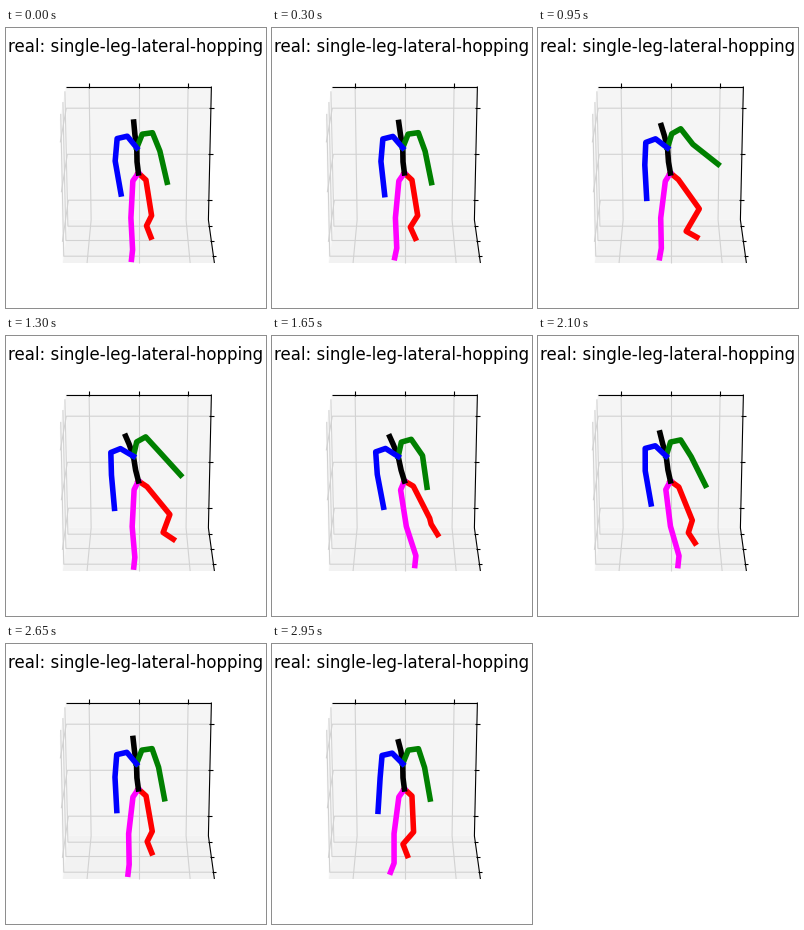
Write a matplotlib script that moves like this. It is 260x280 px and loops after 3000 ms.

```python
import numpy as np
import matplotlib.pyplot as plt
from matplotlib.animation import FuncAnimation

W, H, DPI = 260, 280, 100
FRAMES, STEP = 60, 50

fig = plt.figure(figsize=(W / DPI, H / DPI), dpi=DPI, facecolor="white")
ax = fig.add_axes([0, 0, 1, 1])
ax.set_xlim(0.6, W + 0.6)
ax.set_ylim(H, 0)
ax.axis("off")

# Room corners as (half width, y): wall top, wall foot, floor front, side front
CX = 133.2
TOP, FOOT, FRONT, SIDE = (72.8, 58.5), (69.8, 191.8), (75.8, 235), (78.8, 91)


def left(c):
    return np.array([CX - c[0], c[1]])


def right(c):
    return np.array([CX + c[0], c[1]])


def mix(a, b, f):
    return np.asarray(a) + f * (np.asarray(b) - np.asarray(a))


def stroke(*points, color="black", z=2):
    ax.plot(*np.transpose(points), color=color, lw=0.8, zorder=z,
            solid_capstyle="butt")


def pane(corners, shade):
    ax.fill(*np.transpose(corners), color=str(shade), lw=0, zorder=0)


def rulers(a, b, far_a, far_b, heights):
    """Grid lines and ticks across the panel that runs from a down to b."""
    for y in heights:
        f = (y - a[1]) / (b[1] - a[1])
        edge = mix(a, b, f)
        far = mix(left(far_a), left(far_b), f)
        stroke(far, left(edge), right(edge), color=GRID, z=1)
        x = right(edge)[0]
        stroke((x - 1.5, y), (x + 3, y))


GRID = "#d2d2d2"


def draw_room():
    pane([left(TOP), left(FOOT), left(FRONT), left(SIDE)], 0.975)
    pane([left(FOOT), right(FOOT), right(FRONT), left(FRONT)], 0.95)
    pane([left(TOP), right(TOP), right(FOOT), left(FOOT)], 0.9625)
    for s in (-0.68, 0, 0.68):
        line = [(CX + s * c[0], c[1]) for c in (TOP, FOOT, FRONT)]
        stroke(*line, color=GRID, z=1)
        x = line[0][0]
        stroke((x, 55), (x, 60.3))
    rulers(TOP, FOOT, SIDE, FRONT, (80.2, 126.3, 172.2))
    rulers(FOOT, FRONT, TOP, SIDE, (198.2, 212.5, 228.2))
    stroke(left(TOP), right(TOP))
    stroke(right(TOP), right(FOOT), right(FRONT))


def chain(start, *bones):
    """Joints of a limb; bones are (length, degrees), 0 down, 90 right."""
    length, angle = np.transpose(bones)
    angle = np.radians(angle)
    steps = np.column_stack([length * np.sin(angle), length * np.cos(angle)])
    return np.vstack([start, start + np.cumsum(steps, axis=0)])


PELVIS = np.array([133, 145])


def skeleton(t):
    def phase(centre, width):
        return np.exp(-((t - centre) / width) ** 2)

    # Phases of the hop
    start, end = phase(0, 350), phase(3000, 200)
    tuck, kick = phase(600, 300), phase(1100, 300)
    swing, land = phase(950, 500), phase(1250, 650)
    touch, lean = phase(1650, 250), phase(1640, 610)
    reach, lift = phase(1850, 450), phase(2200, 250)

    spine = chain(
        PELVIS,
        (11.3, 187 + 10 * lean),
        (14, 181 + 11 * lean),
        (13, 188 + 13 * lean + 2 * land + 4 * tuck),
        (13 - 2.8 * lean - 2.5 * land - 3.8 * end,
         185 + 13 * lean + 9 * land + 10 * end + 5 * tuck))
    chest = spine[2]
    left_arm = chain(
        chest,
        (15, 219 + 14 * land + 9 * lean + 6 * end),
        (10.4, -77 + 9 * land),
        (22.5, -5 + 9 * lean),
        (33.5, 3 + 7 * start + 9.5 * reach - 7 * end))
    right_arm = chain(
        chest,
        (14.7, 158 + 7 * lean + 4 * land),
        (10.3, 98 + 25 * kick + 7 * lean),
        (19.8, 18 + 4 * start + 16 * lean + 20 * kick + 6 * lift),
        (32, 10 + 3 * start + 55 * kick + 22 * lift - 4 * lean))
    left_leg = chain(
        PELVIS,
        (9.7, -35 + 12 * lean),
        (37, -7.5 + 4.5 * start + 20 * reach),
        (30.8 + start - 2.5 * tuck - 1.5 * end,
         3 * start + 3 * tuck + 22 * reach),
        (9.8, -6 - 16 * tuck - 16 * end))
    right_leg = chain(
        PELVIS,
        (10.3, 47 + 13 * lean),
        (36, 9 + 17 * lean + 28 * kick + 4 * lift - 7 * end),
        (11 + 15 * swing - 7 * touch + 2.5 * lift + 5.5 * end,
         -26 - 17 * tuck + 40 * touch + 8 * lift - 16 * end),
        (12.2, 21 + 9 * lean + 45 * kick + 9 * tuck + 8 * lift))
    return right_leg, left_leg, spine, right_arm, left_arm


draw_room()
fig.text(130 / W, 1 - 24 / H, "real: single-leg-lateral-hopping", fontsize=12,
         family="DejaVu Sans", ha="center", va="baseline")
limbs = [ax.plot([], [], color=c, lw=4, zorder=5 + i,
                 solid_capstyle="projecting", solid_joinstyle="round")[0]
         for i, c in enumerate(("red", "magenta", "black", "green", "blue"))]


def update(n):
    for limb, joints in zip(limbs, skeleton(n * STEP)):
        limb.set_data(*joints.T)
    return limbs


anim = FuncAnimation(fig, update, frames=FRAMES, interval=STEP,
                     repeat=True, repeat_delay=0)
plt.show()
```
